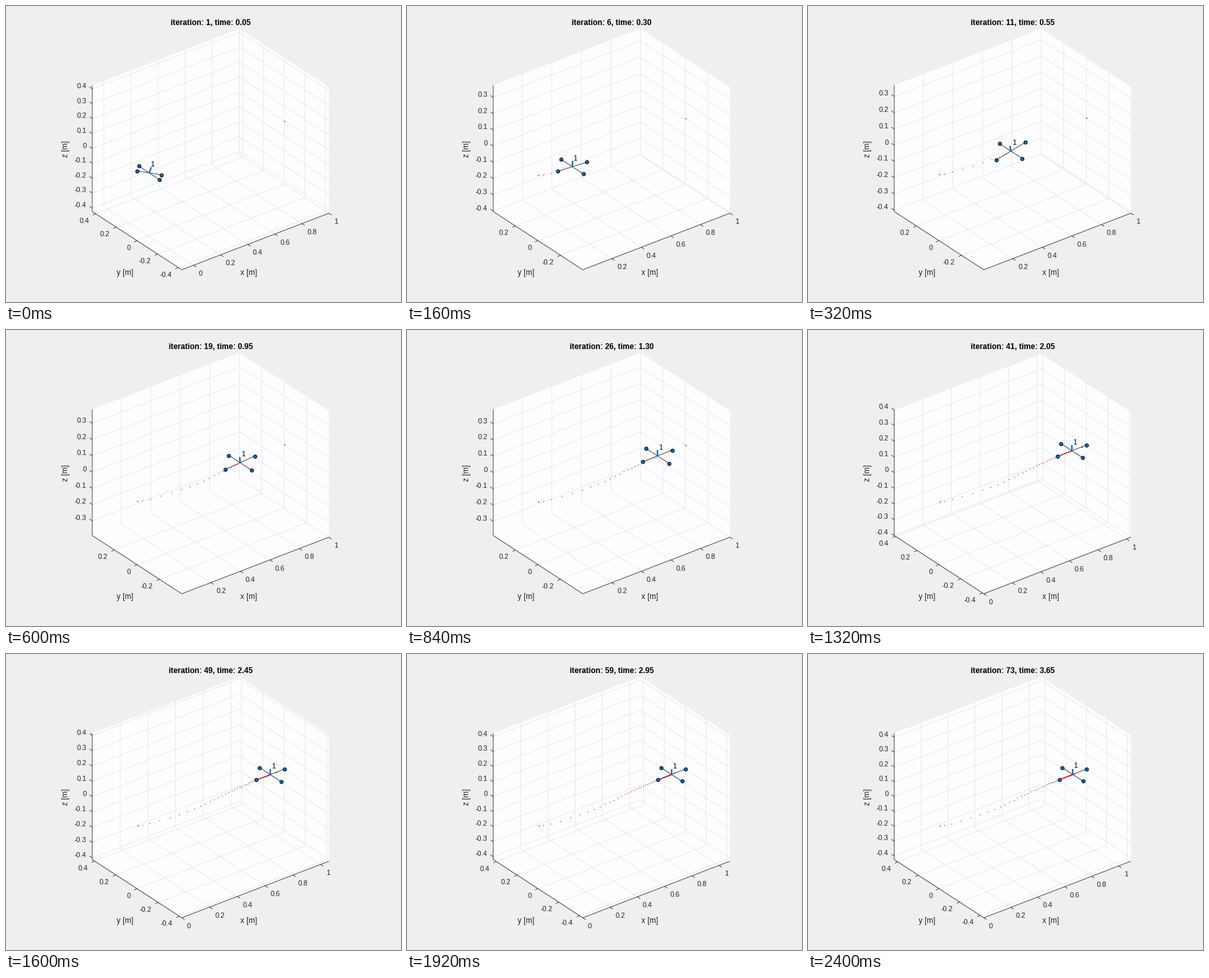
These frames come from a looping animation (600x450 px, 2440 ms). A matplotlib script:

```python
import numpy as np
import matplotlib.pyplot as plt
from matplotlib.animation import FuncAnimation
from matplotlib.collections import LineCollection

W, H, DPI = 600, 450, 100
FRAMES, INTERVAL = 61, 40
PX = 72 / DPI

INK, GRID, WALL, BLUE = "#262626", "#e5e5e7", "#fdfcfe", "#0072bd"

# Screen position of the front corner and the three box edges
FRONT = np.array([267.0, 401.0])
EX = np.array([223.5, -86.0])
EY = np.array([-136.0, -88.5])
EZ = np.array([0.0, -192.0])

ARM, POINTER = 0.1, 0.036


def flight(u):
    """Position and pitch u iterations after the start."""
    lag = (.009 + .0657 * u) * np.exp(-(u / 3.58) ** 1.75)
    x = 1 - .988 * np.exp(-.0665 * u) - lag
    z = -.033 * (u / 7 * np.exp(1 - u / 7)) ** 2.5
    pitch = np.radians((26.5 + 39 * u - 8 * u ** 2) * np.exp(-.35 * u))
    return x, z, pitch


POS_X, POS_Z, PITCH = flight(np.arange(73))

plt.rcParams["font.family"] = "Liberation Sans"
fig = plt.figure(figsize=(W / DPI, H / DPI), dpi=DPI, facecolor="#efeef0")
ax = fig.add_axes([0, 0, 1, 1])


def ticks(lo, hi, step):
    first, last = np.ceil(lo / step - 1e-6), np.floor(hi / step + 1e-6)
    return np.arange(first, last + 1) * step


def number(v):
    return f"{round(v, 1) + 0.0:g}"


def write(x, y, s, size=10.7, color=INK, **kw):
    ax.text(x, y + 1, s, fontsize=size * PX, color=color, va="center", **kw)


def lines(segments, color, width, z):
    ax.add_collection(LineCollection(segments, colors=color,
                                     linewidths=width * PX, zorder=z))


def dots(points, size, color):
    ax.plot(*np.transpose(points), "o", ms=size * PX, mfc=color, mec="none",
            zorder=5)


def limits(n):
    """Axis limits that follow the vehicle and its trail, equally scaled."""
    x, z, pitch = POS_X[n - 1], POS_Z[n - 1], PITCH[n - 1]
    reach, drop = ARM * np.cos(pitch), abs(ARM * np.sin(pitch))
    x1 = max(1, x + reach)
    x0 = 0 if x1 > 1 else min(POS_X[0], x - reach)
    low = min(POS_Z[:n].min(), z - drop)
    high = max(0, z + drop, z + POINTER * np.cos(pitch))
    mid = (low + high) / 2
    hy, hz = .797 * (x1 - x0) / 2, .78 * (x1 - x0) / 2
    return (x0, x1), (-hy, hy), (mid - hz, mid + hz)


def draw_box(xl, yl, zl, at):
    (x0, x1), (y0, y1), (z0, z1) = xl, yl, zl
    outline = [at(x0, y0, z0), at(x1, y0, z0), at(x1, y0, z1),
               at(x1, y1, z1), at(x0, y1, z1), at(x0, y1, z0)]
    ax.add_patch(plt.Polygon(outline, fc=WALL, ec="none", zorder=0))

    tx, ty, tz = ticks(x0, x1, .2), ticks(y0, y1, .2), ticks(z0, z1, .1)
    grid = [[at(v, y0, z0), at(v, y1, z0), at(v, y1, z1)] for v in tx]
    grid += [[at(x0, v, z0), at(x1, v, z0), at(x1, v, z1)] for v in ty]
    grid += [[at(x0, y1, v), at(x1, y1, v), at(x1, y0, v)] for v in tz]
    lines(grid, GRID, .8, 1)

    marks = []
    for v in tx:
        p = at(v, y0, z0)
        marks.append([p, p + (4.2, 2.7)])
        write(p[0] + 8, p[1] + 12, number(v), ha="left")
    for v in ty:
        p = at(x0, v, z0)
        marks.append([p, p + (-4.6, 1.8)])
        write(p[0] - 10, p[1] + 10, number(v), ha="right")
    for v in tz:
        p = at(x0, y1, v)
        marks.append([p, p + (-4.2, -2.7)])
        write(122.5, p[1] - 5, number(v), ha="right")
    edges = [outline[4], outline[5], outline[0], outline[1]]
    lines([edges] + marks, INK, .8, 2)

    write(369, 405, "x [m]", 11.7, ha="center")
    write(181, 404.5, "y [m]", 11.7, ha="center")
    write(91, 216, "z [m]", 11.7, ha="center", rotation=90)


def draw_vehicle(x, z, pitch, at):
    c, s = np.cos(pitch), np.sin(pitch)
    nose = at(x + ARM * c, 0, z - ARM * s)
    tail = at(x - ARM * c, 0, z + ARM * s)
    left, right = at(x, ARM, z), at(x, -ARM, z)
    centre = at(x, 0, z)
    tip = at(x + POINTER * s, 0, z + POINTER * c)
    lines([[nose, tail], [left, right]], "black", .7, 4)
    lines([[centre, tip]], BLUE, 2.2, 6)
    motors = np.array([nose, tail, left, right])
    ax.plot(*motors.T, "o", ms=5.1 * PX, mfc=BLUE, mec="black", mew=PX,
            zorder=7)
    write(centre[0] + 1.5, centre[1] - 13.5, "1", color="black", zorder=8)


def draw(k):
    ax.clear()
    ax.set(xlim=(0, W), ylim=(H, 0))
    ax.axis("off")

    n = 1 + round(1.2 * k)
    box = limits(n)

    def at(*point):
        a, b, c = ((v - lo) / (hi - lo) for v, (lo, hi) in zip(point, box))
        return FRONT + a * EX + b * EY + c * EZ

    draw_box(*box, at)
    draw_vehicle(POS_X[n - 1], POS_Z[n - 1], PITCH[n - 1], at)
    if n > 1:
        dots([at(x, 0, z) for x, z in zip(POS_X[:n], POS_Z[:n])], 1.3, "#dc1428")
    dots([at(1, 0, 0)], 1.6, "#1a1a90")
    write(311, 25.4, f"iteration: {n}, time: {n * .05:.2f}", 11.7,
          ha="center", weight="bold", color="black")
    return []


anim = FuncAnimation(fig, draw, frames=FRAMES, interval=INTERVAL,
                     repeat=True, repeat_delay=0, init_func=lambda: [])
plt.show()
```
